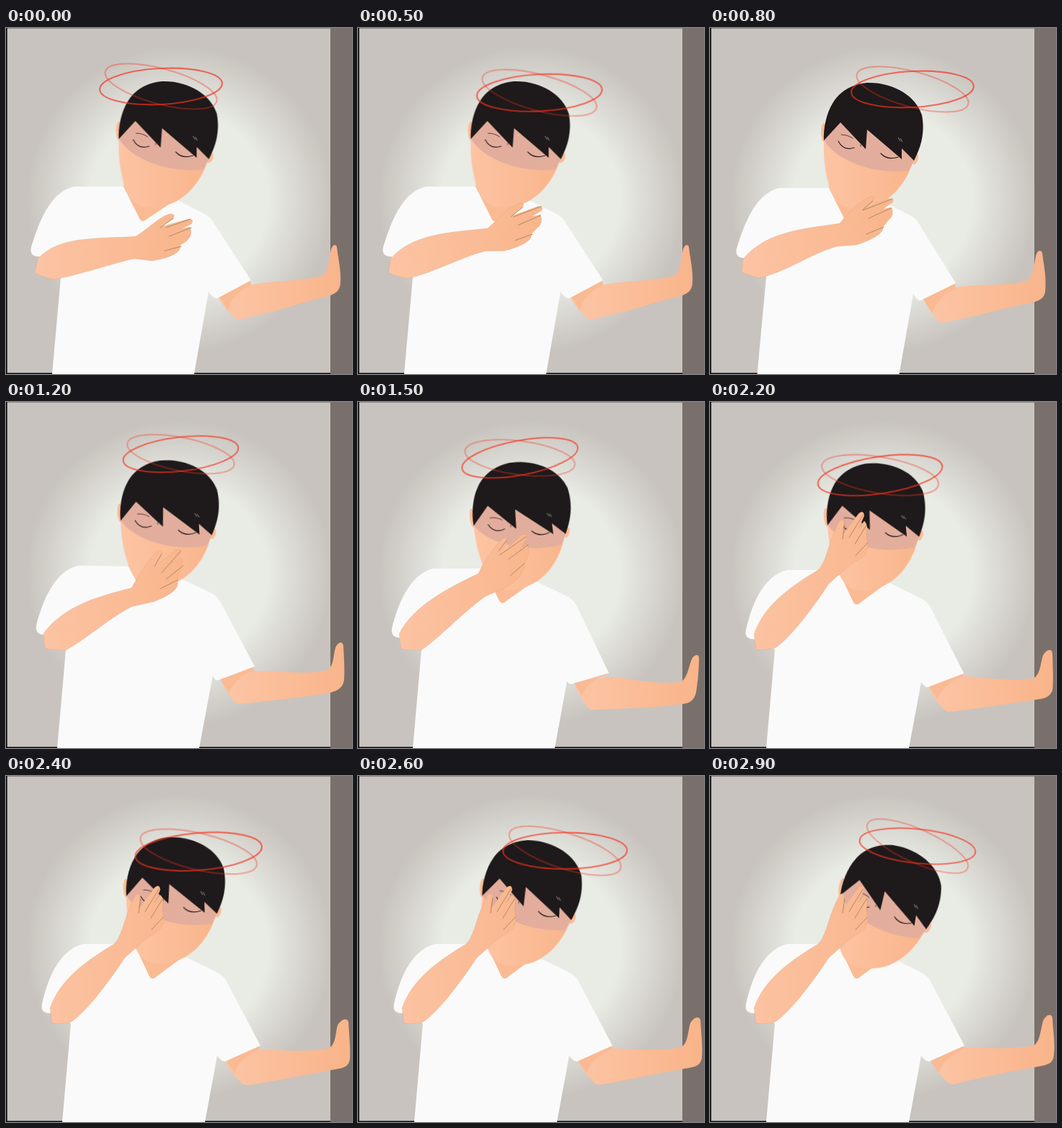
These frames come from a looping animation (480 by 480 pixels, 3 s). An HTML page without scripts:

```html
<!DOCTYPE html>
<html lang="en">
<head>
<meta charset="utf-8">
<title>Dizzy spell</title>
<style>
html, body { margin: 0; height: 100%; overflow: hidden; }
svg { display: block; width: 100vw; height: 100vh; }

.head, .rings, .neck, .shirt, .wall-arm, .sleeve-shade, .raised-arm, .finger-gaps {
  animation: 3s infinite;
}
.head { animation-name: head; transform-origin: 217px 138px; }
.rings { animation-name: orbit; fill: none; stroke: #f4331f; stroke-width: 2.1; }
.neck { animation-name: neck; }
.shirt { animation-name: shirt; fill: #fafafa; }
.wall-arm { animation-name: wall-arm; fill: url(#armSkin); }
.sleeve-shade { animation-name: sleeve-shade; fill: #f9ba94; }
.raised-arm { animation-name: raised-arm; fill: url(#handSkin); stroke: #a87c56; stroke-opacity: .25; stroke-width: .5; }
.finger-gaps { animation-name: finger-gaps; fill: none; stroke: #b08a62; stroke-width: 1; stroke-linecap: round; }

/* Every pose is held for 100 ms, so each segment advances in steps. */
@keyframes head {
  0%, 20% { transform: translate(-.5px, 1px); animation-timing-function: steps(2); }
  26.66% { transform: translate(1px, 3px) rotate(0deg); animation-timing-function: steps(4); }
  40% { transform: translate(1px, 8px) rotate(-3.6deg); animation-timing-function: steps(3); }
  50% { transform: translate(1px, 11px) rotate(-7.6deg); animation-timing-function: steps(4); }
  63.33% { transform: translate(-3.5px, 13px) rotate(-11.3deg); animation-timing-function: steps(5); }
  80% { transform: translate(9.5px, 12px) rotate(-1.6deg); animation-timing-function: steps(5); }
  96.66%, 100% { transform: translate(25.5px, 22px) rotate(9deg); }
}
@keyframes orbit {
  0% { transform: translate(215.5px, 80px) scale(1); animation-timing-function: steps(4); }
  13.33% { transform: translate(243px, 91px) scale(1.03); animation-timing-function: steps(4); }
  26.66% { transform: translate(280px, 82px) scale(1); animation-timing-function: steps(2); }
  33.33% { transform: translate(266px, 70px) scale(.97); animation-timing-function: steps(2); }
  40% { transform: translate(246px, 66px) scale(.945); animation-timing-function: steps(3); }
  50% { transform: translate(233px, 68px) scale(.96); animation-timing-function: steps(4); }
  63.33% { transform: translate(217px, 78px) scale(.98); animation-timing-function: steps(2); }
  70% { transform: translate(225px, 89px) scale(1.02); animation-timing-function: steps(3); }
  80% { transform: translate(259px, 94px) scale(1.035); animation-timing-function: steps(3); }
  90% { transform: translate(274px, 81px) scale(1); animation-timing-function: steps(2); }
  96.66%, 100% { transform: translate(252px, 69px) scale(.95); }
}
@keyframes neck {
  0%, 20% { transform: none; animation-timing-function: steps(2); }
  26.66% { transform: translate(2px, 2px); animation-timing-function: steps(4); }
  40% { transform: translate(7px, 7px); animation-timing-function: steps(3); }
  50% { transform: translate(12px, 11px); animation-timing-function: steps(3); }
  60%, 100% { transform: translate(14px, 13px); }
}
@keyframes shirt {
  0%, 20% { d: path("M94,220 L163,220 L185,264 Q188,271 194,266 L236,238 L272,256 Q284,261 290,273 L340,350 L293,375 Q288,376 281,366 L261,480 H64 L76,345 L46,317 Q32,317 35,304 C45,272 60,228 94,220Z"); animation-timing-function: steps(2); }
  26.66% { d: path("M96,222 L165,222 L187,266 Q190,273 196,268 L238,240 L274,258 Q286,263 292,275 L341,354 L292,378 Q288,379 282,369 L262.5,480 H65.5 L78,345 L48,319 Q34,319 37,306 C47,274 62,230 96,222Z"); animation-timing-function: steps(4); }
  40% { d: path("M100,227 L170,228 L192,270 Q195,277 201,272 L242,245 L281,263 Q293,268 299,280 L345,367 L294,386 Q289,387 287,379 L268,480 H71 L83,344 L54,323 Q40,323 42,310 C50,279 66,235 100,227Z"); animation-timing-function: steps(3); }
  50% { d: path("M104,231 L175,231 L195,274 Q199,283 206,276 L245,248 L287,268 Q299,273 304,284 L348,376 L297,391 Q292,392 290,387 L273,480 H76 L88,344 L59,327 Q45,327 47,314 C55,283 70,240 104,231Z"); animation-timing-function: steps(3); }
  60%, 63.33% { d: path("M107,233 L178,233 L198,276 Q202,285 209,278 L247,250 L290,271 Q302,276 307,287 L351,380 L300,395 Q296,396 293,389 L276,480 H78 L90,343 L61,329 Q47,329 50,316 C57,285 72,242 107,233Z"); animation-timing-function: steps(5); }
  80%, 100% { d: path("M107,233 L178,233 L198,276 Q202,285 209,278 L247,250 L290,271 Q302,276 307,287 L353,374 L304,396 Q300,397 293,388 L276,480 H78 L90,343 L61,329 Q47,329 50,316 C57,285 72,242 107,233Z"); }
}
@keyframes wall-arm {
  0%, 20% { d: path("M300,372 L338,357 C372,349 415,352 441,343 C447,335 449,318 451,307 C453,300 458,299 459,304 C461,322 465,335 464,354 C463,366 456,368 450,371 C410,381 365,396 322,405 C316,405 300,384 295,374Z"); animation-timing-function: steps(2); }
  26.66% { d: path("M300,374 L341,360 C375,354 415,359 441,350 C449,342 450,327 452,316 C454,308 459,307 461,312 C463,330 467,345 465,366 C463,376 456,378 450,380 C410,388 365,401 322,409 C316,408 300,387 297,376Z"); animation-timing-function: steps(4); }
  40% { d: path("M300,384 L344,373 C380,373 415,379 446,372 C455,366 454,351 457,341 C460,333 467,331 468,338 C469,355 470,372 469,386 C467,397 460,400 451,403 C410,410 365,415 322,419 C316,418 303,397 298,387Z"); animation-timing-function: steps(3); }
  50% { d: path("M303,390 L347,381 C380,384 415,393 448,388 C457,384 459,366 463,357 C466,350 473,349 473,355 C473,375 471,390 469,403 C466,415 459,418 450,419 C410,424 365,426 323,427 C316,425 305,403 300,391Z"); animation-timing-function: steps(4); }
  63.33% { d: path("M305,394 L351,382 C385,385 420,394 451,392 C459,386 461,371 465,360 C468,353 475,351 475,358 C475,378 474,393 473,405 C471,415 462,420 452,421 C410,426 365,429 326,431 C320,428 306,408 302,395Z"); animation-timing-function: steps(5); }
  80% { d: path("M306,395 L351,379 C380,380 415,384 447,378 C458,374 457,355 460,346 C464,338 473,334 475,341 C476,360 478,376 477,393 C476,402 469,405 462,406 C410,415 365,425 333,429 C326,428 309,408 304,396Z"); animation-timing-function: steps(5); }
  96.66%, 100% { d: path("M308,394 L352,376 C380,377 415,380 449,374 C458,369 459,350 462,340 C465,332 473,328 475,335 C476,355 479,370 477,387 C476,398 470,400 461,402 C410,411 365,421 336,428 C329,427 312,406 306,394Z"); }
}
@keyframes sleeve-shade {
  0%, 20% { d: path("M291,366 L338,346 L340,357 Q316,366 308,391Z"); animation-timing-function: steps(6); }
  40% { d: path("M294,379 L342,362 L344,373 Q319,380 309,404Z"); animation-timing-function: steps(7); }
  63.33% { d: path("M298,387 L348,374 L350,383 Q322,391 313,413Z"); animation-timing-function: steps(5); }
  80%, 100% { d: path("M301,388 L350,368 L352,378 Q325,391 317,412Z"); }
}
@keyframes raised-arm {
  0% { d: path("M44,320 C75,288 120,293 180,289 C198,278 212,262 227,258 Q236,257 232,264 L214,276 L253,265 Q262,265 257,272 L242,279 L255,276 Q260,287 250,296 L242,301 Q244,316 203,323 L177,320 C140,329 100,343 66,349 Q50,345 40,340Z"); animation-timing-function: steps(8); }
  26.66% { d: path("M46,320 C78,283 125,279 180,271 C190,258 210,238 224,233 Q229,233 227,238 L212,252 L247,237 Q257,236 253,242 L240,251 L252,249 Q256,260 248,266 L240,276 Q242,288 203,301 L176,303 C140,313 105,339 68,347 Q54,343 44,339Z"); animation-timing-function: steps(4); }
  40% { d: path("M52,321 C81,282 130,269 174,258 C183,243 200,212 212,206 Q218,205 215,212 L206,228 L236,205 Q245,202 242,210 L230,224 L243,215 Q247,225 240,236 L237,246 Q245,262 205,277 L174,284 C140,302 110,330 82,345 Q66,344 54,342Z"); animation-timing-function: steps(3); }
  50% { d: path("M57,322 C76,283 125,258 167,238 C174,222 186,203 201,189 Q208,186 206,195 L198,212 L227,184 Q236,181 234,189 L224,206 L234,197 Q240,208 232,222 L229,234 Q222,250 199,260 L176,270 C140,297 110,330 88,344 Q72,345 60,343Z"); animation-timing-function: steps(4); }
  63.33%, 100% { d: path("M61,322 C75,282 110,257 150,233 C162,222 165,190 180,165 Q186,160 186,168 L184,184 L206,155 Q213,149 214,158 L206,176 L214,165 Q220,170 217,184 L219,200 Q218,215 199,222 L165,252 C140,290 110,328 91,341 Q76,345 64,343Z"); }
}
@keyframes finger-gaps {
  0% { d: path("M214,277 L232,264 M222,277 L256,265 M226,289 L257,277 M220,309 L243,303"); animation-timing-function: steps(8); }
  26.66% { d: path("M212,252 L226,240 M212,253 L253,237 M220,264 L251,250 M217,286 L241,276"); animation-timing-function: steps(4); }
  40% { d: path("M206,228 L216,211 M216,237 L242,207 M222,246 L246,227 M214,259 L238,247"); animation-timing-function: steps(3); }
  50% { d: path("M195,207 L206,192 M197,212 L233,187 M209,218 L236,198 M211,241 L231,224"); animation-timing-function: steps(4); }
  63.33%, 100% { d: path("M184,190 L187,170 M193,188 L212,157 M201,197 L217,171 M202,213 L218,196"); }
}
</style>
</head>
<body>
<svg viewBox="0 0 480 480">
  <defs>
    <radialGradient id="glow" gradientUnits="userSpaceOnUse" cx="240" cy="238" r="212">
      <stop offset=".58" stop-color="#e9ebe5"/>
      <stop offset=".78" stop-color="#d9d8d2"/>
      <stop offset="1" stop-color="#c8c3be"/>
    </radialGradient>
    <linearGradient id="armSkin" gradientUnits="userSpaceOnUse" x1="310" x2="470" y1="0" y2="0">
      <stop stop-color="#fcc4a4"/>
      <stop offset="1" stop-color="#f9b48a"/>
    </linearGradient>
    <linearGradient id="handSkin" gradientUnits="userSpaceOnUse" x1="40" x2="240" y1="0" y2="0">
      <stop stop-color="#fcc4a4"/>
      <stop offset="1" stop-color="#f9b68d"/>
    </linearGradient>
    <linearGradient id="faceSkin" gradientUnits="userSpaceOnUse" x1="157" x2="280" y1="0" y2="0">
      <stop stop-color="#fdc4a3"/>
      <stop offset="1" stop-color="#f9b58b"/>
    </linearGradient>
    <linearGradient id="pallor" gradientUnits="userSpaceOnUse" x1="160" x2="280" y1="0" y2="0">
      <stop stop-color="#e2ad9e"/>
      <stop offset="1" stop-color="#e3ae9b"/>
    </linearGradient>
  </defs>

  <rect width="480" height="480" fill="url(#glow)"/>
  <rect width="450" height="1" fill="#8d8884"/>
  <path d="M.75,0V479.4H450" fill="none" stroke="#0c0809" stroke-width="1.8"/>
  <rect x="450" width="30" height="480" fill="#7a706b"/>

  <path class="wall-arm"/>
  <path class="sleeve-shade"/>
  <path class="neck" d="M164,200 L163,224 L185,268 L192,272 L233,241 L220,200Z" fill="#fabb94"/>
  <path class="shirt"/>

  <g class="head">
    <ellipse cx="157" cy="142" rx="4" ry="13" fill="#fbbd97"/>
    <ellipse cx="284" cy="179" rx="3.5" ry="7.5" transform="rotate(20 284 179)" fill="#fbbd97"/>
    <path d="M160,140 L157,155 C156,185 161,212 170,230 C178,246 195,250 212,247 C244,244 267,217 277,192 L284,175 L265,130Z" fill="url(#faceSkin)"/>
    <path d="M157,152 C172,180 225,201 274,195 L282,181 L260,120 L180,125Z" fill="url(#pallor)"/>
    <g fill="none" stroke="#30201f" stroke-width="1.2" stroke-linecap="round">
      <path d="M177,154 Q184,168 199,163 M236,171 Q245,181 260,176"/>
      <path d="M181,145 Q190,145 197,150 M208,159 V161" stroke-width=".8"/>
    </g>
    <path d="M157,153 C156,138 160,115 170,100 C181,82 202,73 220,73 C255,73 285,92 293,118 C298,145 290,165 282,181 L265,164 L265,179 L217,138 L215,165 L180,128Z" fill="#1e191a"/>
    <path d="M260,149 L263,154 M263,150 L266,155" stroke="#a9a3a0" stroke-width=".8"/>
    <g class="rings">
      <ellipse rx="80" ry="24.5" transform="rotate(15)" opacity=".36"/>
      <ellipse rx="85" ry="25" transform="rotate(-3)" opacity=".68"/>
    </g>
  </g>

  <path class="raised-arm"/>
  <path class="finger-gaps"/>
</svg>
</body>
</html>
```
